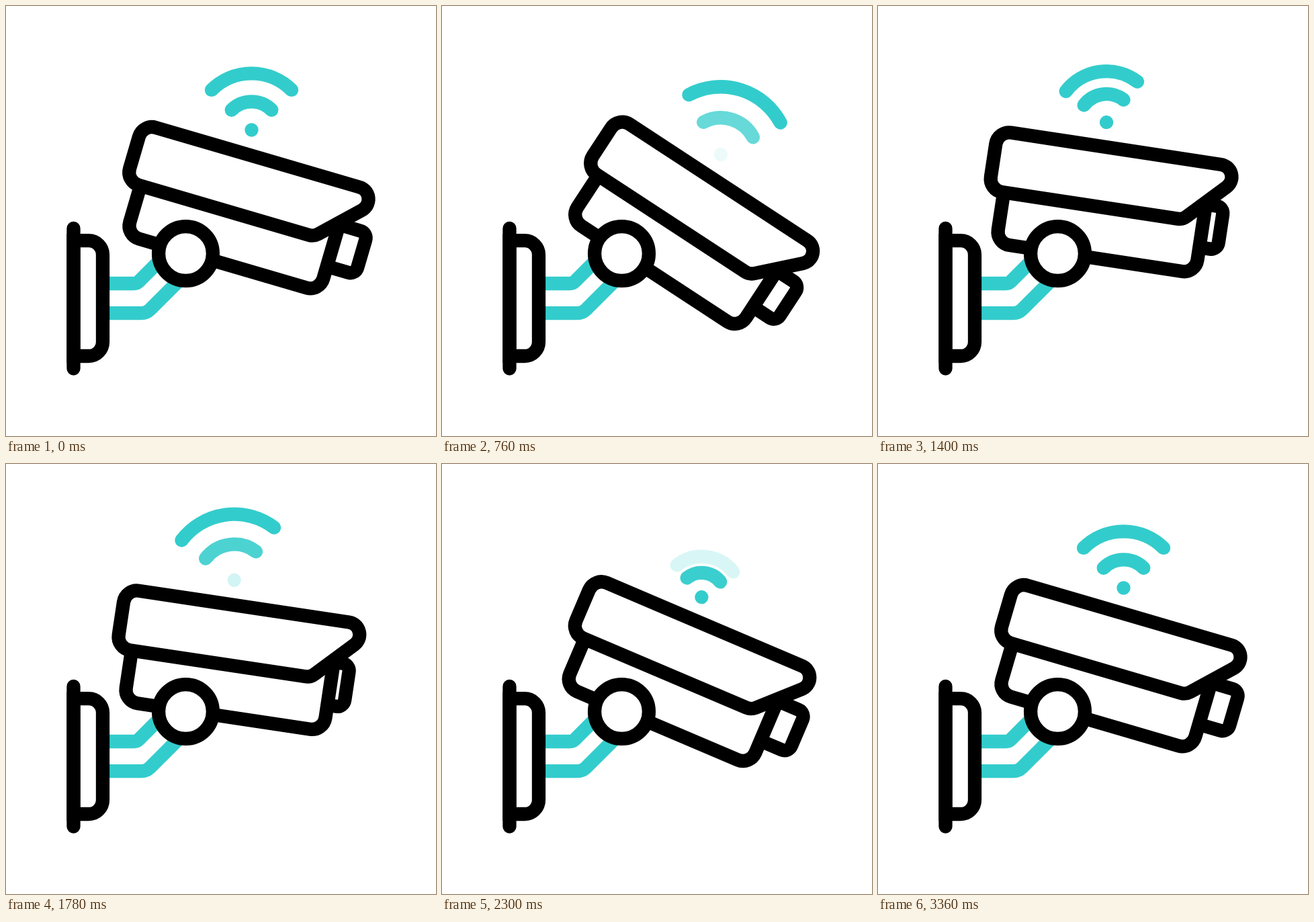
Recreate the animation shown at these times as an HTML page with a canvas. Size 640 by 640 pixels, loop 3600 ms.

```html
<!DOCTYPE html>
<html lang="en">
<head>
<meta charset="utf-8">
<title>Security camera</title>
<style>
  html, body { margin: 0; width: 100%; height: 100%; overflow: hidden; background: #fff; }
  canvas { display: block; width: 100vw; height: 100vh; }
</style>
</head>
<body>
<canvas id="stage" width="640" height="640"></canvas>
<script>
const ctx = document.getElementById('stage').getContext('2d');
const LOOP = 3600, TEAL = '#33cccc', LINE = 20.3;
const HUB = { x: 267.5, y: 368.5 }, TILT = 16.3;
const rad = deg => deg * Math.PI / 180;

// Progress from 0 to 1 over a time span: linear, and eased at both ends.
const ramp = (t, start, length) => Math.min(1, Math.max(0, (t - start) / length));
function ease(t, start, length) {
  const u = ramp(t, start, length);
  return u * u * (3 - 2 * u);
}

// Down, up, down a little, back to rest.
const swing = t => 18.4 * ease(t, 0, 640) - 26.9 * ease(t, 640, 850)
  + 18.8 * ease(t, 1680, 860) - 10.3 * ease(t, 2540, 700);

// The lens slides in, out past its rest place, and back.
const lensShift = t => -20 * ease(t, 400, 1320) + 35 * ease(t, 1720, 1020)
  - 15 * ease(t, 2740, 620);

// Signal parts, dot first, grow and fade away one after another,
// then come back small in the same order. This happens twice per loop.
function signalPart(t, i) {
  const back = 846 + 154 * i;
  const second = t >= back + 560;
  const out = second ? t - 1045 : t;
  const come = second ? t - 1110 : t;
  const returned = come >= back;
  return {
    alpha: returned ? ramp(come, back, 200) : 1 - ramp(out, 580 + 130 * i, 200),
    scale: returned ? 0.7 + 0.3 * ease(come, back, 400)
                    : 1 + 0.378 * ease(out, 335 + 90 * i, 480),
    drop: returned ? 28 * (1 - ease(come, back, 386)) : 0
  };
}

function paint(color, fill) {
  if (fill) {
    ctx.fillStyle = fill;
    ctx.fill();
  }
  ctx.strokeStyle = color;
  ctx.stroke();
}

function box(x, y, w, h, radii) {
  ctx.beginPath();
  ctx.roundRect(x, y, w, h, radii);
  paint('#000', '#fff');
}

function atHub(angle, draw) {
  ctx.save();
  ctx.translate(HUB.x, HUB.y);
  ctx.rotate(rad(angle));
  draw();
  ctx.restore();
}

function drawSignal(t) {
  ctx.translate(98, -184);
  ctx.lineCap = 'round';
  for (let i = 0; i < 3; i++) {
    const { alpha, scale, drop } = signalPart(t, i);
    ctx.globalAlpha = alpha;
    ctx.beginPath();
    if (i === 0) {
      ctx.arc(0, drop, LINE / 2, 0, 2 * Math.PI);
      ctx.fillStyle = TEAL;
      ctx.fill();
    } else {
      ctx.arc(0, 0, 42.1 * i * scale, rad(-135), rad(-45));
      paint(TEAL);
    }
  }
}

function drawHood() {
  const left = -115.6, right = 265.4, top = -167.5, bottom = -78;
  const slant = right - (bottom - top);
  ctx.beginPath();
  ctx.moveTo(0, top);
  ctx.arcTo(right, top, slant, bottom, 18.6);
  ctx.arcTo(slant, bottom, left, bottom, 18);
  ctx.arcTo(left, bottom, left, top, 20);
  ctx.arcTo(left, top, 0, top, 20);
  ctx.closePath();
  paint('#000', '#fff');
}

function drawCamera(t) {
  box(187, -105.5, 64.2 + lensShift(t), 64.7, 11);
  box(-93, -121, 300, 119.5, [0, 0, 20, 20]);
  drawHood();
}

// Arm that runs out from the wall and turns up at 45 degrees.
function drawArm(bend, y, rise, radius) {
  ctx.beginPath();
  ctx.moveTo(144, y);
  ctx.arcTo(bend, y, bend + rise, y - rise, radius);
  ctx.lineTo(bend + rise, y - rise);
  paint(TEAL);
}

function drawMount() {
  drawArm(194.7, 413, 45, 10);
  drawArm(209, 457.2, 58, 18);
  box(100.5, 349.2, 43.5, 171.8, [0, 21, 21, 0]);
  ctx.lineCap = 'round';
  ctx.beginPath();
  ctx.moveTo(100.5, 331);
  ctx.lineTo(100.5, 539.5);
  paint('#000');
  ctx.lineCap = 'butt';
}

function drawHub() {
  ctx.beginPath();
  ctx.arc(HUB.x, HUB.y, 40.4, 0, 2 * Math.PI);
  paint('#000', '#fff');
}

function frame(now) {
  const t = now % LOOP, angle = swing(t);
  ctx.fillStyle = '#fff';
  ctx.fillRect(0, 0, 640, 640);
  ctx.lineWidth = LINE;
  drawMount();
  atHub(angle, () => drawSignal(t));
  atHub(angle + TILT, () => drawCamera(t));
  drawHub();
  requestAnimationFrame(frame);
}
frame(0);
</script>
</body>
</html>
```
